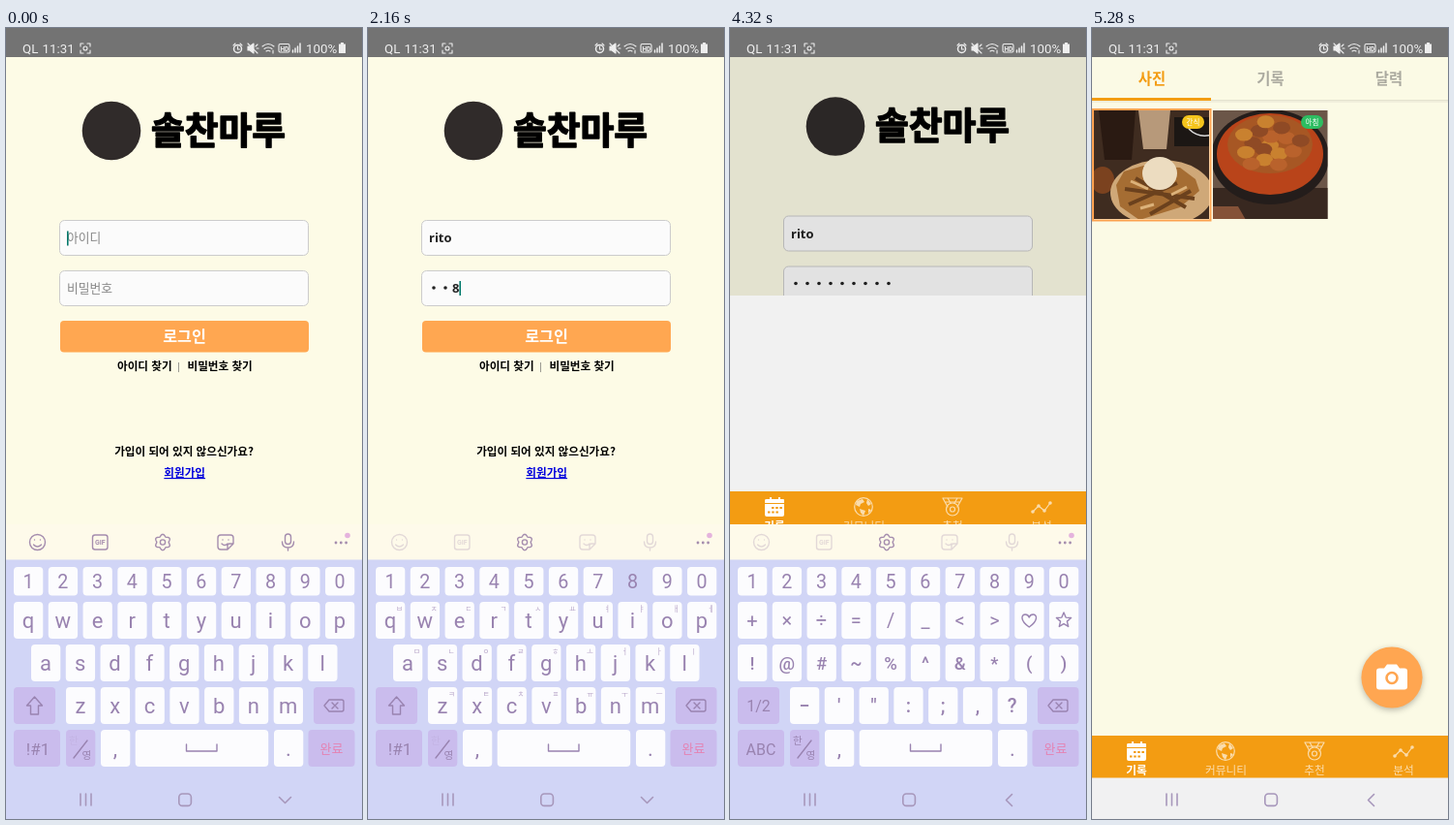
An HTML page for the animation above (5.4 s loop, 368 by 816 pixels).

```html
<!DOCTYPE html>
<html lang="ko">
<head>
<meta charset="utf-8">
<style>
html, body { margin: 0; width: 100%; height: 100%; overflow: hidden; background: #fdfbe6; }
svg { display: block; font-family: "Noto Sans CJK KR", "Noto Sans CJK", sans-serif; }
.mid { text-anchor: middle; }
.latin { font-family: Roboto, sans-serif; }
.field { font: 600 13px "Noto Sans", sans-serif; fill: #222; }
.box { fill: #fbfbfb; stroke: #ccc; }
.line { fill: none; stroke-width: 1.4; stroke-linecap: round; stroke-linejoin: round; }
.off { opacity: .65; }
</style>
</head>
<body>
<svg width="368" height="816" viewBox="0 0 368 816">
  <clipPath id="reveal"><rect id="revealBox" width="368" height="816"/></clipPath>
  <clipPath id="shot1"><path d="M2 85h119v112H2z"/></clipPath>
  <clipPath id="shot2"><path d="M125 85h118.5v112H125z"/></clipPath>

  <rect width="368" height="816" fill="#fdfbe6"/>
  <g id="login">
    <circle cx="109" cy="106" r="30.3" fill="#302b2a"/>
    <text x="150" y="118.5" font-size="37.8" font-weight="900" stroke="#000" stroke-width="1.4" stroke-linejoin="round">솔찬마루</text>
    <rect class="box" x="55.5" y="198.5" width="257" height="36" rx="5"/>
    <rect class="box" x="55.5" y="250.5" width="257" height="36" rx="5"/>
    <g font-size="12.8" fill="#878787">
      <text id="idHint" x="63" y="221">아이디</text>
      <text id="pwHint" x="63" y="272.5">비밀번호</text>
    </g>
    <text id="idText" class="field" x="63" y="221"></text>
    <g id="dots" fill="#222"></g>
    <text id="pwText" class="field" y="273"></text>
    <rect id="caret" width="1.6" height="15" fill="#00796b"/>
    <g id="button">
      <rect x="56" y="302" width="257" height="32.5" rx="4" fill="#ffa751"/>
      <text class="mid" x="184.5" y="323.5" font-size="16.2" font-weight="700" fill="#fff">로그인</text>
    </g>
    <g font-size="11.6" font-weight="700">
      <text x="115" y="353">아이디 찾기</text>
      <text x="177.5" y="353" font-size="9" font-weight="400" fill="#555">|</text>
      <text x="187.5" y="353">비밀번호 찾기</text>
      <text class="mid" x="184" y="441">가입이 되어 있지 않으신가요?</text>
      <text class="mid" x="184.7" y="463" fill="#0000dd" text-decoration="underline">회원가입</text>
    </g>
  </g>
  <rect id="dim" width="368" height="816" opacity=".1"/>

  <g id="page" clip-path="url(#reveal)">
    <rect id="sheet" width="368" height="816"/>
    <g id="head">
      <rect y="30" width="368" height="45" fill="#fbfae5"/>
      <rect y="74" width="368" height="1.5" fill="#e4e2d0"/>
      <rect y="75.5" width="368" height="1.5" fill="#f1efdc"/>
      <rect y="72" width="123" height="3" fill="#f39c12"/>
    </g>
    <g id="content">
      <g class="mid" font-size="15.4" font-weight="700" fill="#aaa99f">
        <text x="62" y="58" fill="#f39c12">사진</text>
        <text x="184.5" y="58">기록</text>
        <text x="307" y="58">달력</text>
      </g>
      <rect x="1" y="84" width="121.5" height="114.5" fill="none" stroke="#fca250" stroke-width="2"/>
      <g id="photos">
        <g clip-path="url(#shot1)">
          <rect y="85" width="123" height="113" fill="#3f2c20"/>
          <path d="M48 85h33l-4 40H53z" fill="#b7997a"/>
          <path d="M7 85h38l-4 51H13z" fill="#2a1a12"/>
          <path d="M85 92h36v30H85z" fill="#1c1714"/>
          <ellipse cx="11" cy="157" rx="12" ry="14" fill="#7b421f"/>
          <ellipse cx="72" cy="170" rx="53" ry="34" fill="#cfa878"/>
          <path d="M25 162l8-14 20-6 38 2 16 12 4 12-20 17-42 13-20-14z" fill="#a56d33"/>
          <path d="M34 166l72 10M45 155l52 30M38 182l50-22M60 192l42-24" stroke="#6b411d" stroke-width="4"/>
          <path d="M40 158l18 8M82 172l16-8M50 186l14-4" stroke="#dcb27a" stroke-width="3"/>
          <ellipse cx="70" cy="150" rx="18" ry="17" fill="#ecdcc0"/>
          <path d="M100 104q10 10 24 6" fill="none" stroke="#ddd" stroke-width="1.5"/>
        </g>
        <g clip-path="url(#shot2)">
          <rect x="125" y="85" width="119" height="113" fill="#6b5648"/>
          <path d="M125 165h119v33H125z" fill="#382820"/>
          <path d="M125 184h26l8 14h-34z" fill="#845238"/>
          <ellipse cx="184" cy="133" rx="61" ry="49" fill="#241d1b"/>
          <ellipse cx="184" cy="130" rx="55" ry="42" fill="#b9441a"/>
          <ellipse cx="184" cy="120" rx="44" ry="30" fill="#a75724"/>
          <g id="chunks"></g>
        </g>
      </g>
      <g class="mid" font-size="7.5" fill="#fff">
        <rect x="93" y="90" width="23" height="14" rx="7" fill="#f4c41c"/>
        <text x="104.5" y="99.7">간식</text>
        <rect x="216" y="90" width="23" height="14" rx="7" fill="#2dbd61"/>
        <text x="227.5" y="99.7">아침</text>
      </g>
      <g style="filter:drop-shadow(0 2px 3px #0004)"><circle cx="310" cy="670" r="31.6" fill="#ffa651"/></g>
      <path d="M297 660.500h5l3-4h10l3 4h5q3 0 3 3v16q0 3-3 3h-26q-3 0-3-3v-16q0-3 3-3z" fill="#fff"/>
      <circle cx="310" cy="670.500" r="5.500" fill="none" stroke="#ffa651" stroke-width="2.600"/>
    </g>
    <rect y="773" width="368" height="43" fill="#f1f1f2"/>
    <g id="bar">
      <rect width="368" height="43.5" fill="#f39c12"/>
      <g class="mid" font-size="11.7" fill="#fff">
        <text x="46" y="39.5" font-weight="700">기록</text>
        <g class="off">
          <text x="138.5" y="39.5">커뮤니티</text>
          <text x="230" y="39.5">추천</text>
          <text x="322" y="39.5">분석</text>
        </g>
      </g>
      <path d="M38 8h3V6h2v2h7V6h2v2h3q1 0 1 1v3H36V9q0-1 2-1zM36 13h20v11q0 2-2 2H38q-2 0-2-2z" fill="#fff"/>
      <path d="M43 17h11M39 21.5h11" stroke="#f39c12" stroke-width="2.2" stroke-dasharray="2.5 1.7"/>
      <g class="off line" stroke="#fff" style="stroke-width:1.2">
        <circle cx="138" cy="16" r="9.3"/>
        <path d="M131 10l6-2 2 3-4 2-1 3-4-2zM134 18l6 2-2 5-3-3zM142 8l4 5-3 2-2-3zM143 18l3 1-3 4z" fill="#fff" stroke="none"/>
        <path d="M220 7h20l-5 9M220 7l5 9M225 7l3 5M235 7l-3 5M223 11h14"/>
        <circle cx="230" cy="18.5" r="6.5"/><circle cx="230" cy="18.5" r="2.5"/>
        <path d="M313 21l6-6 6 5 6-8"/>
        <path d="M313 21h0M319 15h0M325 20h0M331 12h0" stroke-width="3.6"/>
      </g>
    </g>
  </g>

  <g id="board">
    <rect y="512" width="368" height="37" fill="#fefaea"/>
    <rect y="548.5" width="368" height="267.5" fill="#d1d5f6"/>
    <g class="line" stroke="#a58dae">
      <g id="tools">
        <circle cx="32.5" cy="530.5" r="8"/>
        <path d="M28.5 533q4 4 8 0M29.5 528h0M35.5 528h0"/>
        <rect x="89.5" y="523" width="15.5" height="15" rx="2.5"/>
        <text class="mid latin" x="97.3" y="533.3" font-size="7" font-weight="700" fill="#a58dae" stroke="none">GIF</text>
        <path d="M222 523h10q3 0 3 3v6l-6 6h-7q-3 0-3-3v-9q0-3 3-3zM235 532h-4q-2 0-2 2v4M223 532q3 3 6 0M224 528h0M230 528h0"/>
        <rect x="288.5" y="522" width="6" height="10.5" rx="3"/>
        <path d="M285.5 530q0 6 6 6t6-6M291.5 536v3"/>
      </g>
      <path id="gear"/><circle cx="162" cy="530.5" r="2.6"/>
      <path d="M341 531h0M346.3 531h0M351.6 531h0" stroke-width="2.8"/>
    </g>
    <circle cx="353" cy="523.5" r="2.8" fill="#e5b3dd"/>
    <g id="shared"></g>
    <g id="letters"></g>
    <g id="symbols"></g>
  </g>

  <g class="line" stroke="#a797bb" style="stroke-width:1.6">
    <path d="M77 790v12M82.5 790v12M88 790v12"/>
    <rect x="178.8" y="790" width="12.6" height="12.4" rx="3.5"/>
    <path id="back"/>
  </g>

  <rect width="368" height="30" fill="#737373"/>
  <g class="latin" font-size="13.3" fill="#eee">
    <text x="17" y="26">QL</text><text x="37.5" y="26">11:31</text>
    <text x="310" y="26">100%</text>
    <path d="M344 16.5h2V15h3v1.5h2V26h-7z"/>
    <text x="283.5" y="23.5" font-size="6.5" font-weight="700">HD</text>
  </g>
  <g class="line" stroke="#eee" style="stroke-width:1.1">
    <path d="M77 19v-3h3M84 16h3v3M87 23v3h-3M80 26h-3v-3"/><circle cx="82" cy="21" r="2"/>
    <circle cx="239.5" cy="21.5" r="4" style="stroke-width:1.5"/><path d="M239.5 19v3h2M235 18l2-2M244 18l-2-2"/>
    <path d="M250 19h2l4-3v10l-4-3h-2z" fill="#eee"/><path d="M250 16l10 10M258 19l2-2M259 21h2"/>
    <path d="M265 19q6-5 12 0M267 21.5q4-3 8 0M269 24q2-1.5 4 0M276 23v3"/>
    <rect x="282" y="16.5" width="11" height="8.5" rx="1.5"/>
    <path d="M296.5 25v-2M299 25v-4M301.5 25v-6M304 25v-9" style="stroke-width:1.5"/>
  </g>
</svg>
<script>
const $ = id => document.getElementById(id);
const show = (id, on) => $(id).style.display = on ? '' : 'none';
const move = (id, y) => $(id).setAttribute('transform', `translate(0 ${y})`);

const LOOP = 5400, TICK = 120, PITCH = 35.78, INK = '#9983b0';
const SYMBOLS_AT = 3120, FOCUS_PW = 1200, MASK_AT = 3720, OPEN_AT = 4320;
// [time, key, hold]
const idTaps = [[240, 'r'], [480, 'i'], [600, 't'], [720, 'o', 240]];
const pwTaps = [[1800, 'a'], [2040, '5'], [2160, '8'], [2280, '3'], [2400, '7'],
  [2640, '9'], [2760, '0'], [2880, '8'], [3360, '!']];
const allTaps = [...idTaps, ...pwTaps, [3000, '!#1']];
// Reveal edge, tab bar top and page offset while the new screen opens
const opening = [[276, 478, 9], [64, 731, 1], [30, 730, 0]];

const label = (s, x, y, size, weight = 400) =>
  `<text class="mid latin" x="${x}" y="${y}" font-size="${size}" font-weight="${weight}" fill="${INK}">${s}</text>`;
const cap = (key, x, y, w, h, dark) =>
  `<rect data-key="${key}" x="${x}" y="${y}" width="${w}" height="${h}" rx="4" fill="${dark ? '#cabced' : '#fcfcfe'}"/>`;
const icon = d => `<path class="line" stroke="${INK}" d="${d}"/>`;
const ring = (n, x, y, radius) => 'M' + Array.from({length: n}, (_, i) => {
  const a = 2 * Math.PI * i / n, r = radius(i, a);
  return `${x + r * Math.sin(a)} ${y - r * Math.cos(a)}`;
}).join('L') + 'z';

function row(chars, x0, y, h, size, {hints = '', weight} = {}) {
  return [...chars].map((c, i) => {
    const x = x0 + i * PITCH, cx = x + 15, cy = y + h / 2;
    const name = c === '"' ? '&quot;' : c === '<' ? '&lt;' : c === '&' ? '&amp;' : c;
    let face = label(name, cx, cy + size * .355, size, weight);
    if (c === '♡') face = icon(`M${cx} ${cy + 7}c-10-7-8-13-4-13q3 0 4 3q1-3 4-3c4 0 6 6-4 13z`);
    if (c === '☆') face = icon(ring(10, cx, cy, k => k % 2 ? 3.6 : 8));
    const hint = hints[i] ? `<text class="mid hint" x="${x + 24.5}" y="${y + 10}" font-size="7.5" fill="#b7a5c8">${hints[i]}</text>` : '';
    return cap(name, x, y, 30.3, h) + face + hint;
  }).join('');
}

$('shared').innerHTML = row('1234567890', 8, 556, 29.5, 19.7)
  + cap('del', 318, 680, 42.5, 38, 1) + icon('M329 699l5-6h13q2 0 2 2v8q0 2-2 2h-13zM337 696l6 6M343 696l-6 6')
  + cap('lang', 62, 724, 30.3, 38, 1) + icon('M70 753l14-18')
  + `<text id="han" x="65" y="739" font-size="10.5" fill="${INK}">한</text>`
  + `<text x="78.5" y="754" font-size="10.5" fill="${INK}">영</text>`
  + cap(',', 98, 724, 30.3, 38) + label(',', 113, 751, 22)
  + cap('space', 133.7, 724, 137.5, 38) + icon('M186.5 739v7h31.5v-7')
  + cap('.', 277, 724, 30.3, 38) + label('.', 292, 751, 22)
  + cap('done', 312.5, 724, 48, 38, 1)
  + '<text class="mid" x="336.5" y="748" font-size="13" fill="#e483b3">완료</text>';

$('letters').innerHTML = row('qwertyuiop', 8, 592, 38, 22, {hints: 'ㅂㅈㄷㄱㅅㅛㅕㅑㅐㅔ'})
  + row('asdfghjkl', 26, 636, 38, 22, {hints: 'ㅁㄴㅇㄹㅎㅗㅓㅏㅣ'})
  + row('zxcvbnm', 62, 680, 38, 22, {hints: 'ㅋㅌㅊㅍㅠㅜㅡ'})
  + cap('shift', 8, 680, 43, 38, 1) + icon('M29.5 690l8 9h-4v9h-8v-9h-4z')
  + cap('!#1', 8, 724, 48, 38, 1) + label('!#1', 33, 749.5, 17);

$('symbols').innerHTML = row('+×÷=/_<>♡☆', 8, 592, 38, 20)
  + row('!@#~%^&*()', 8, 636, 38, 18.5, {weight: 500})
  + row(`−'":;,?`, 62, 680, 38, 20, {weight: 500})
  + cap('1/2', 8, 680, 43, 38, 1) + label('1/2', 29.5, 705, 16)
  + cap('ABC', 8, 724, 48, 38, 1) + label('ABC', 32, 749.5, 16);

$('gear').setAttribute('d', ring(60, 162, 530.5, (_, a) => 7.2 + Math.cos(6 * a)));
$('dots').innerHTML = pwTaps.map((_, i) => `<circle cx="${68 + 12 * i}" cy="268" r="1.8"/>`).join('');
$('chunks').innerHTML = Array.from({length: 16}, (_, i) => {
  const a = i * 2.4, r = 9 * Math.sqrt(i);
  return `<ellipse cx="${184 + r * Math.cos(a)}" cy="${121 + r * .7 * Math.sin(a)}" rx="9" ry="6.5"
    fill="${['#c9812f', '#8f4a25', '#b9622c'][i % 3]}"/>`;
}).join('');

const caps = [...document.querySelectorAll('[data-key]')];
const hints = [...document.querySelectorAll('.hint')];

function drawLogin(t) {
  const onPw = t >= FOCUS_PW;
  const typed = taps => taps.filter(tap => t >= tap[0]);
  const id = typed(idTaps), pw = typed(pwTaps);
  const clear = pw.length && t < MASK_AT ? 1 : 0, masked = pw.length - clear;
  $('idText').textContent = id.map(tap => tap[1]).join('');
  $('pwText').textContent = clear ? pw[masked][1] : '';
  $('pwText').setAttribute('x', 63 + 12 * masked);
  [...$('dots').children].forEach((dot, i) => dot.style.display = i < masked ? '' : 'none');
  show('idHint', !id.length);
  show('pwHint', !pw.length);

  const last = Math.max(onPw ? FOCUS_PW : 0, ...[...id, ...pw].map(tap => tap[0]));
  const width = onPw ? 12 * masked + (clear && $('pwText').getComputedTextLength())
    : id.length && $('idText').getComputedTextLength();
  $('caret').setAttribute('x', 63 + width);
  $('caret').setAttribute('y', onPw ? 261 : 209.5);
  show('caret', t < 3960 && (t - last) % 1000 < 500);
  $('button').style.opacity = t >= 3840 && t < 4080 ? .5 : 1;
  move('login', t >= OPEN_AT ? -4.5 : 0);
}

function drawBoard(t) {
  const onPw = t >= FOCUS_PW, sym = t >= SYMBOLS_AT;
  const leaving = t >= OPEN_AT + TICK;
  show('board', t < OPEN_AT + 2 * TICK);
  move('board', leaving ? 54 : 0);
  $('board').style.opacity = leaving ? .18 : 1;
  show('letters', !sym);
  show('symbols', sym);
  $('tools').style.opacity = onPw ? .3 : 1;
  $('han').style.opacity = sym ? 1 : .15;
  hints.forEach(h => h.style.display = onPw ? '' : 'none');
  const held = allTaps.filter(([at, , hold = 120]) => t >= at && t < at + hold).map(tap => tap[1]);
  caps.forEach(c => c.style.opacity = held.includes(c.dataset.key) ? 0 : 1);
  $('back').setAttribute('d', t < OPEN_AT ? 'M282.5 793.5l6 6 6-6' : 'M291.5 790.5l-6 6 6 6');
}

function drawPage(t) {
  const open = t >= OPEN_AT, ready = t >= 4680;
  show('dim', open);
  show('page', open);
  if (!open) return;
  const [edge, bar, shift] = opening[Math.min(2, (t - OPEN_AT) / TICK)];
  $('revealBox').setAttribute('y', edge);
  move('head', shift);
  move('bar', bar);
  $('sheet').setAttribute('fill', ready ? '#fbfae5' : '#f1f1f1');
  show('content', ready);
  $('photos').style.opacity = Math.min(1, Math.max(0, (t - 4800) / 360));
}

function frame() {
  const t = Math.floor(performance.now() % LOOP / TICK) * TICK;
  drawLogin(t);
  drawBoard(t);
  drawPage(t);
  requestAnimationFrame(frame);
}
frame();
</script>
</body>
</html>
```
